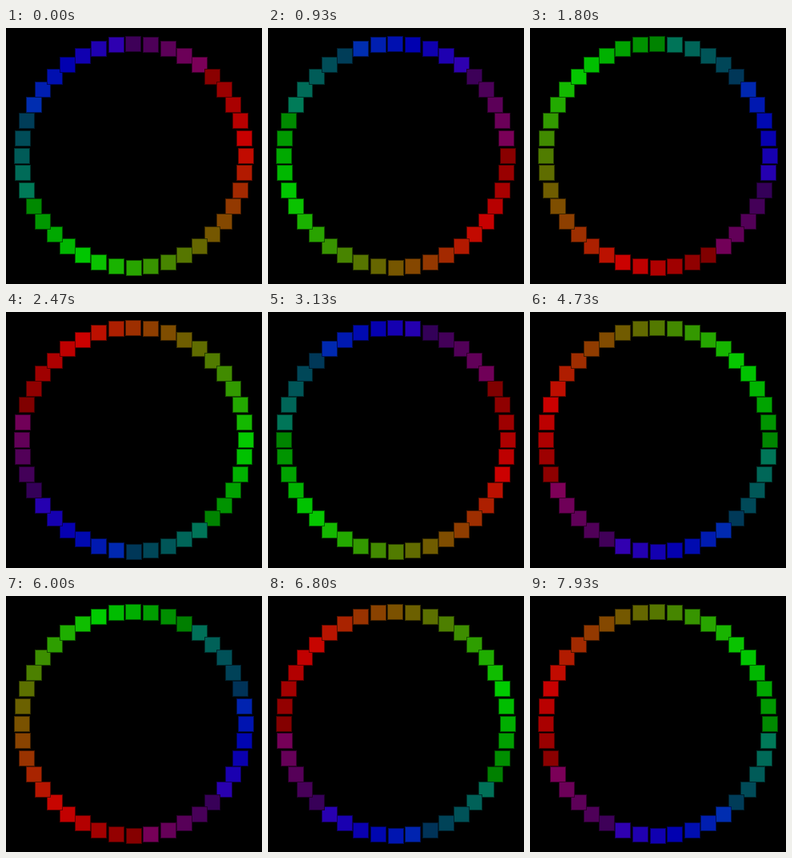
An HTML page with a canvas that plays this animation: 320x320 px, repeating every 8000 ms.

```html
<!DOCTYPE html>
<html lang="en">
<head>
<meta charset="utf-8">
<title>Rainbow ring</title>
<style>
html, body { margin: 0; width: 100%; height: 100%; overflow: hidden; background: #000; }
canvas { display: block; width: 100vw; height: 100vh; object-fit: contain; }
</style>
</head>
<body>
<canvas id="stage" width="320" height="320"></canvas>
<script>
const ctx = document.getElementById('stage').getContext('2d');
const COUNT = 40, RADIUS = 140, CENTER = 160, SIZE = 20;
const LOOP = 8000, STEPS = 120;
const PHASE = 4.5, SPEED = 15.975; // on a colour wheel of 256 units
const DIM = 0.8;

// Linear blend red -> green -> blue -> red, dimmed, with coarse steps of blue
function wheel(pos) {
  const p = ((pos % 256 + 256) % 256) / 256 * 3;
  const part = Math.floor(p);
  const up = (p - part) * 255;
  const rgb = [0, 0, 0];
  rgb[part] = 255 - up;
  rgb[(part + 1) % 3] = up;
  const [r, g, b] = rgb;
  return `rgb(${Math.round(r * DIM)},${Math.round(g * DIM)},${Math.floor(b / 96) * 88})`;
}

function draw(step) {
  ctx.fillStyle = '#000';
  ctx.fillRect(0, 0, 320, 320);
  ctx.strokeStyle = 'rgba(0,0,0,0.5)';
  for (let i = 0; i < COUNT; i++) {
    const a = i / COUNT * 2 * Math.PI;
    const x = Math.floor(CENTER - SIZE / 2 + RADIUS * Math.cos(a));
    const y = Math.floor(CENTER - SIZE / 2 + RADIUS * Math.sin(a));
    ctx.fillStyle = wheel(i * 256 / COUNT + PHASE + step * SPEED);
    ctx.fillRect(x, y, SIZE, SIZE);
    ctx.strokeRect(x + 0.5, y + 0.5, SIZE - 1, SIZE - 1);
  }
}

const start = performance.now();
function tick() {
  const t = (performance.now() - start) % LOOP;
  // small lead, as step times are rounded to 10 ms
  draw(Math.min(STEPS - 1, Math.floor((t + 4) * STEPS / LOOP)));
  requestAnimationFrame(tick);
}
tick();
</script>
</body>
</html>
```
